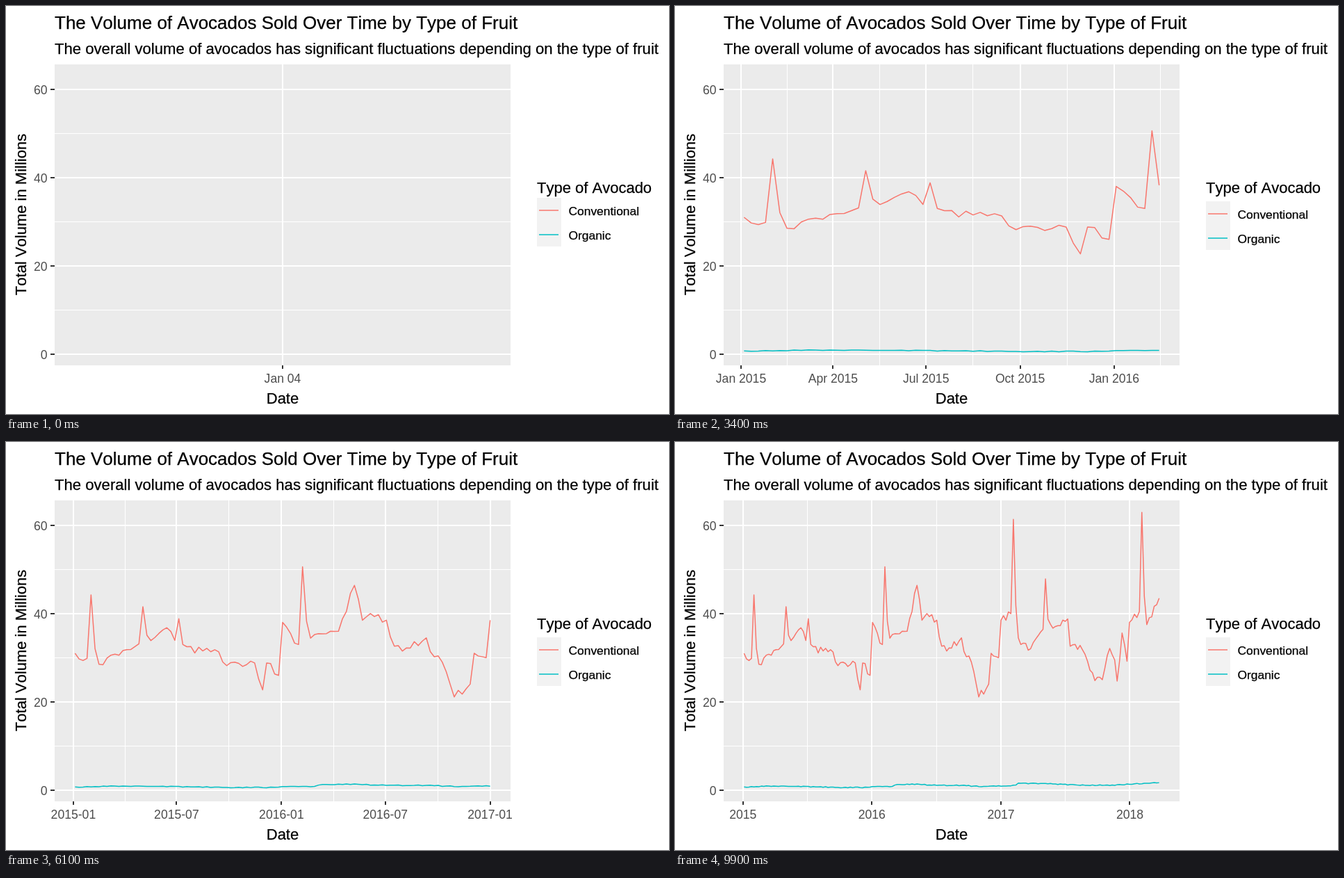
An HTML page for the animation above (10 s loop, 954 px wide and 587 px high).

```html
<!DOCTYPE html>
<html lang="en">
<head>
<meta charset="utf-8">
<title>Avocado volume</title>
<style>
  html, body { margin: 0; width: 954px; height: 587px; overflow: hidden; background: #fff; }
  svg { display: block; }
  text { font: 22px "Liberation Sans", Arial, sans-serif; font-kerning: none; fill: #000; stroke: #000; stroke-width: .25; }
  .title { font-size: 26px; }
  .subtitle { font-size: 22.12px; }
  .key { font-size: 17.4px; }
  .axis { font-size: 17.6px; fill: #4d4d4d; stroke: none; }
  .mid { text-anchor: middle; }
  .end { text-anchor: end; }
  .major { stroke: #fff; stroke-width: 2; }
  .minor { stroke: #fff; stroke-width: 1; }
  .tick { stroke: #333; stroke-width: 2; }
  .line { fill: none; stroke-width: 1.5; stroke-linejoin: round; }
  .conv { stroke: #f8766d; }
  .org { stroke: #00bfc4; }
</style>
</head>
<body>
<svg width="954" height="587" viewBox="0 0 954 587">
  <rect width="954" height="587" fill="#fff"/>
  <text class="title" x="70" y="33">The Volume of Avocados Sold Over Time by Type of Fruit</text>
  <text class="subtitle" x="70" y="69">The overall volume of avocados has significant fluctuations depending on the type of fruit</text>
  <rect x="70" y="84" width="656" height="433" fill="#ebebeb"/>
  <g id="yAxis"></g>
  <g id="xAxis"></g>
  <path id="conv" class="line conv"/>
  <path id="org" class="line org"/>
  <text class="mid" x="398" y="572">Date</text>
  <text class="mid" transform="translate(29 300) rotate(-90)">Total Volume in Millions</text>
  <text x="764" y="269">Type of Avocado</text>
  <g id="legend">
    <rect x="764" y="281" width="35" height="70" fill="#f2f2f2"/>
    <path class="line conv" d="M767 299H795"/>
    <path class="line org" d="M767 334H795"/>
    <text class="key" x="809.5" y="306">Conventional</text>
    <text class="key" x="809.5" y="341">Organic</text>
  </g>
</svg>
<script>
const LEFT = 69.5, WIDTH = 657;
const FRAMES = 100, STEP = 100, LAST = 168;
const DAY = 864e5, YEAR = 365.25, START = Date.UTC(2015, 0, 4);
const MONTHS = "Jan Feb Mar Apr May Jun Jul Aug Sep Oct Nov Dec".split(" ");
const $ = id => document.getElementById(id);

const pairs = spec => spec.split(" ").map(p => p.split(":").map(Number));

function seeded(seed) {
  return () => (seed = seed * 16807 % 2147483647) / 2147483647;
}

// Weekly values: straight runs between "week:value" points, with jitter inside each run
function series(spec, jitter) {
  const pts = pairs(spec), rand = seeded(2015), out = [];
  for (let i = 1; i < pts.length; i++) {
    const [a, va] = pts[i - 1], [b, vb] = pts[i];
    for (let w = a; w <= b; w++) {
      const inside = w > a && w < b;
      out[w] = va + (vb - va) * (w - a) / (b - a) + (inside ? jitter * (2 * rand() - 1) : 0);
    }
  }
  return out;
}

// Holiday demand: a one-week jump that fades during the next week
function addSpikes(data, spec) {
  for (const [week, rise] of pairs(spec)) {
    data[week] += rise;
    data[week + 1] += rise * .2;
  }
  return data;
}

// Volumes in millions, week 0 is 4 January 2015
const conventional = addSpikes(series(
  "0:31 6:28.5 15:32.5 18:33.5 23:36.8 27:32 35:31.8 38:28.2 45:28.8 47:22.7 48:28.8 51:26 " +
  "52:38 55:33.3 64:36 66:36 70:46.4 72:38.5 74:40 78:38.5 80:32.6 82:31.5 88:34.5 89:31.4 " +
  "92:29 95:21.1 99:24 100:31 103:30 104:38.5 108:40 111:34.5 115:31.7 120:35.8 131:38.8 " +
  "132:32.6 136:32.8 142:24.8 145:25 148:32.1 150:29.5 151:24.7 153:35.6 155:29.2 156:38 " +
  "160:40.5 163:37.5 168:43.5", .9),
  "4:15.5 17:8 26:5 57:17.6 109:23.3 122:10.8 161:23.1");
const organic = series(
  "0:.7 8:.82 17:.85 30:.7 37:.55 50:.6 53:.78 60:.8 61:1.1 68:1.35 78:1.05 88:1.05 95:.78 " +
  "105:.9 110:1.1 111:1.55 126:1.35 135:1.1 150:1.05 158:1.4 168:1.65", .1);

const toDate = day => new Date(START + day * DAY);
const toDay = (y, m, d) => (Date.UTC(y, m, d) - START) / DAY;
const pad = n => String(n).padStart(2, "0");
const yPos = v => 500.6 - v * 6.343;

// Label styles
const monthOf = t => MONTHS[t.getUTCMonth()];
const monthDay = t => monthOf(t) + " " + pad(t.getUTCDate());
const monthName = (t, span) => monthOf(t) + (span < YEAR ? "" : " " + t.getUTCFullYear());
const yearMonth = t => t.getUTCFullYear() + "-" + pad(t.getUTCMonth() + 1);
const yearOnly = t => String(t.getUTCFullYear());

// Break spacings; at(lo, k) is the k-th candidate counted from a round start
const byMonths = (n, label) => ({
  size: YEAR / 12 * n, label,
  at: (lo, k) => {
    const t = toDate(lo);
    return toDay(t.getUTCFullYear(), (n > 1 ? 0 : t.getUTCMonth()) + k * n, 1);
  }
});
const spacings = [
  { size: 7, label: monthDay, at: (lo, k) => 1 + 7 * (Math.floor((lo - 1) / 7) + k) },
  { size: YEAR / 24, label: monthDay, at: (lo, k) => {
    const t = toDate(lo);
    return toDay(t.getUTCFullYear(), t.getUTCMonth() + (k >> 1), k & 1 ? 15 : 1);
  } },
  byMonths(1, monthName), byMonths(3, monthName), byMonths(6, yearMonth), byMonths(12, yearOnly)
];

// Breaks from the last one before lo to the first one after hi
function cover(s, lo, hi) {
  let k = 0;
  while (s.at(lo, k + 1) <= lo) k++;
  const out = [s.at(lo, k)];
  while (out[out.length - 1] < hi) out.push(s.at(lo, ++k));
  return out;
}

// Choose the spacing that gives closest to five intervals
function pickBreaks(lo, hi) {
  const span = hi - lo;
  const miss = s => Math.abs(span / s.size - 5);
  let i = 0;
  spacings.forEach((s, j) => { if (miss(s) < miss(spacings[i])) i = j; });
  let days = cover(spacings[i], lo, hi);
  const n = days.length - 1;
  const j = Math.max(0, Math.min(spacings.length - 1, i + Math.sign(n - 5)));
  const other = cover(spacings[j], lo, hi), m = other.length - 1;
  if (m >= 2 && Math.abs(m - 5) < Math.abs(n - 5)) { days = other; i = j; }
  return days.filter(d => d >= lo && d <= hi)
    .map(d => ({ day: d, label: spacings[i].label(toDate(d), span) }));
}

// Halfway points, continued one interval past both ends
function midpoints(days) {
  if (days.length < 2) return [];
  const gap = days[1] - days[0];
  const all = [days[0] - gap, ...days, days[days.length - 1] + gap];
  return all.slice(1).map((d, i) => (d + all[i]) / 2);
}

const stroke = (cls, d) => `<path class="${cls}" d="${d}"/>`;

function drawYAxis() {
  let s = "";
  for (let v = 0; v <= 60; v += 10) {
    const y = Math.round(yPos(v));
    if (v % 20) {
      s += stroke("minor", `M70 ${Math.floor(yPos(v)) + .5}H726`);
    } else {
      s += stroke("major", `M70 ${y}H726`) + stroke("tick", `M64 ${y}H70`) +
        `<text class="axis end" x="59.6" y="${y + 7}">${v}</text>`;
    }
  }
  $("yAxis").innerHTML = s;
}

function draw(frame) {
  const week = Math.min(LAST, Math.floor((frame + .5) * LAST / (FRAMES - 1)));
  const margin = week ? week * .35 : .5;
  const lo = -margin, hi = week * 7 + margin;
  const xPos = day => LEFT + (day - lo) / (hi - lo) * WIDTH;
  const breaks = week ? pickBreaks(lo, hi) : [{ day: 0, label: monthDay(toDate(0)) }];

  let s = "";
  for (const d of midpoints(breaks.map(b => b.day))) {
    if (d > lo && d < hi) s += stroke("minor", `M${Math.floor(xPos(d)) + .5} 84V517`);
  }
  for (const b of breaks) {
    const x = xPos(b.day), px = Math.round(x);
    s += stroke("major", `M${px} 84V517`) + stroke("tick", `M${px} 517V522`) +
      `<text class="axis mid" x="${x.toFixed(1)}" y="542">${b.label}</text>`;
  }
  $("xAxis").innerHTML = s;

  const trace = data => week ? "M" + data.slice(0, week + 1)
    .map((v, w) => xPos(w * 7).toFixed(2) + " " + yPos(v).toFixed(2)).join("L") : "";
  $("conv").setAttribute("d", trace(conventional));
  $("org").setAttribute("d", trace(organic));
  $("legend").setAttribute("transform", week ? "" : "translate(0 -5)");
}

let shown = -1;
function tick() {
  const frame = Math.floor(performance.now() / STEP) % FRAMES;
  if (frame !== shown) draw(shown = frame);
  requestAnimationFrame(tick);
}
drawYAxis();
tick();
</script>
</body>
</html>
```
